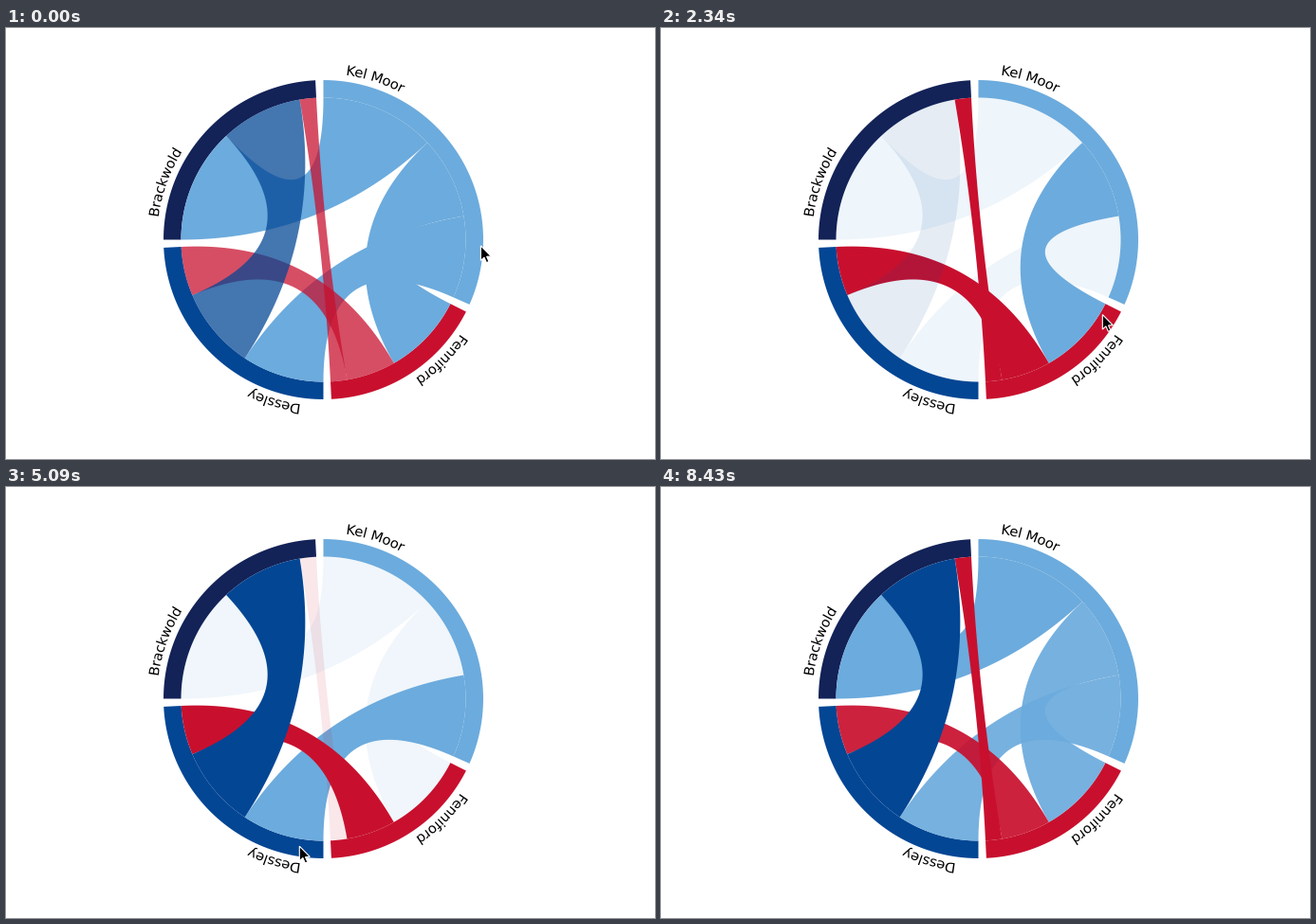
Animation of 684x455 px, one loop 9.57 s. Source, as a matplotlib script:

```python
import numpy as np
import matplotlib.pyplot as plt
from matplotlib.animation import FuncAnimation
from matplotlib.patches import PathPatch, Polygon
from matplotlib.path import Path
from matplotlib.textpath import TextPath

W, H, DPI = 684, 455, 100
STEP, LOOP, LAST_MOVE = 30, 9570, 8430
CX, CY = 334.5, 223.5
R_OUT, R_IN, R_TEXT = 168.5, 150, 175.5
PAD = np.degrees(0.05)
FADE, DIM, LEAD = 250, 0.1, 104

NAMES = ["Kel Moor", "Fenniford", "Dessley", "Brackwold"]
COLORS = ["#6CABDD", "#C8102E", "#034694", "#132257"]
FLOWS = {(0, 1): 5, (0, 2): 5, (0, 3): 7, (1, 2): 3, (1, 3): 1, (2, 3): 5}

# Key points of the pointer: time in ms, clockwise angle from the top, radius
POINTER = np.array([
    (0, 92.2, 166), (120, 94.8, 162), (1440, 94.8, 162), (2067, 113.9, 157),
    (2160, 118.2, 153.5), (2460, 123.1, 152.4), (3700, 123.1, 152.4),
    (4560, 187.7, 158), (4890, 187.7, 158), (5190, 190.2, 157.5),
    (5520, 190.2, 157.5), (5910, 211, 149), (6150, 228.8, 158.7),
    (6630, 270.3, 160), (6930, 277.2, 163.8), (8160, 277.2, 163.8),
    (8250, 276.5, 168.6), (8370, 274, 317)])
ARROW = np.array([(0, 0), (0, 15.6), (3.6, 12.3), (6, 17.8),
                  (8.6, 16.7), (6.2, 11.4), (11, 11.2)])


def polar(angle, r):
    a = np.radians(angle)
    return np.column_stack([CX + r * np.sin(a), CY - r * np.cos(a)])


def arc(a0, a1, r):
    return polar(np.linspace(a0, a1, 60), r)


def bend(a0, a1):
    """Quadratic curve between two inner points, pulled to the centre."""
    p, q = polar(np.array([a0, a1]), R_IN)
    t = np.linspace(0, 1, 50)[:, None]
    return (1 - t) ** 2 * p + 2 * t * (1 - t) * np.array([CX, CY]) + t ** 2 * q


def ribbon(a, b):
    return np.vstack([arc(*a, R_IN), bend(a[1], b[0]),
                      arc(*b, R_IN), bend(b[1], a[0])])


def layout():
    """Angles of each group, and of its parts from largest to smallest."""
    unit = (360 - len(NAMES) * PAD) / (2 * sum(FLOWS.values()))
    groups, parts, angle = [], {}, 0
    for i in range(len(NAMES)):
        start = angle
        for pair in sorted((p for p in FLOWS if i in p), key=lambda p: -FLOWS[p]):
            end = angle + FLOWS[pair] * unit
            parts[i, pair] = (angle, end)
            angle = end
        groups.append((start, angle))
        angle += PAD
    return groups, parts


def curved_text(text, start):
    flat = TextPath((0, 0), text, size=14.4, prop={"family": "DejaVu Sans"})
    x, y = flat.vertices.T
    return Path(polar(start + np.degrees(x / R_TEXT), R_TEXT + y), flat.codes)


def pointer_at(t):
    return [np.interp(t, POINTER[:, 0], POINTER[:, k]) for k in (1, 2)]


def hovered(t):
    angle, r = pointer_at(t)
    if R_IN <= r <= R_OUT:
        for i, (a0, a1) in enumerate(groups):
            if a0 <= angle <= a1:
                return i
    return None


def hover_changes():
    changes, last = [], None
    for t in range(-LEAD, LAST_MOVE):
        group = hovered(t)
        if group != last:
            changes.append((t, group))
            last = group
    return changes


def ease(t):
    t = np.clip(t, 0, 1)
    return 4 * t ** 3 if t < 0.5 else 1 - 4 * (1 - t) ** 3


def opacity(pair, t):
    """Leaving restores every ribbon; entering dims those of other groups."""
    v0, v1, begin = 1, 1, -LEAD

    def value(now):
        return v0 + (v1 - v0) * ease((now - begin) / FADE)

    for when, group in changes:
        if when > t:
            break
        if group is None or group not in pair:
            v0, v1, begin = value(when), 1 if group is None else DIM, when
    return value(t)


fig = plt.figure(figsize=(W / DPI, H / DPI), dpi=DPI, facecolor="white")
ax = fig.add_axes([0, 0, 1, 1])
ax.set_xlim(0, W)
ax.set_ylim(H, 0)
ax.axis("off")

groups, parts = layout()
changes = hover_changes()

for (a0, a1), name, color in zip(groups, NAMES, COLORS):
    ring = np.vstack([arc(a0, a1, R_OUT), arc(a1, a0, R_IN)])
    ax.add_patch(Polygon(ring, fc=color, lw=0))
    ax.add_patch(PathPatch(curved_text(name, a0 + 7.7), fc="black", lw=0))

ribbons = {}
for pair in FLOWS:
    i, j = pair
    shape = Polygon(ribbon(parts[i, pair], parts[j, pair]), fc=COLORS[i],
                    lw=0, zorder=2)
    ribbons[pair] = ax.add_patch(shape)

pointer = ax.add_patch(Polygon(ARROW, fc="black", ec="white", lw=0.8,
                               joinstyle="miter", zorder=5))


def draw(i):
    t = min(i * STEP, LAST_MOVE)
    # Moves show on every second tick, shifted by one tick in the second half
    t -= (t - STEP * (t > LOOP / 2)) % (2 * STEP)
    for pair, shape in ribbons.items():
        shape.set_alpha(opacity(pair, t))
    pointer.set_xy(ARROW + polar(*pointer_at(t)))
    pointer.set_visible(t < LAST_MOVE)
    return [*ribbons.values(), pointer]


anim = FuncAnimation(fig, draw, frames=LOOP // STEP, interval=STEP,
                     repeat=True, repeat_delay=0, blit=False)
plt.show()
```
